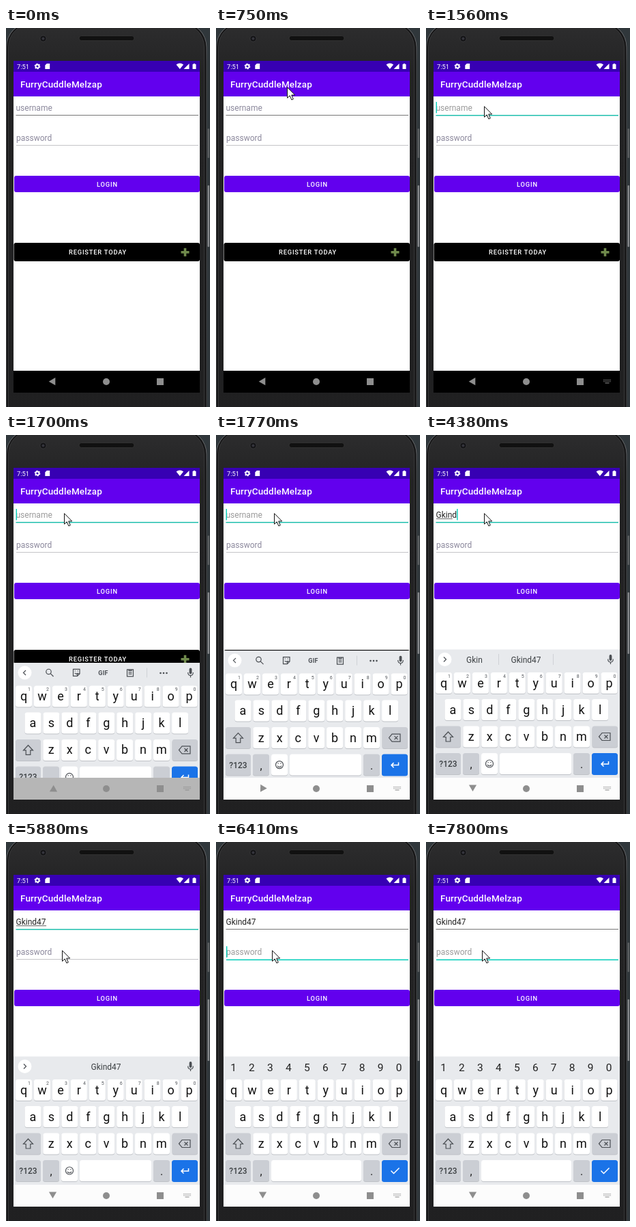
These frames come from a looping animation (299x554 px, 8 s). An HTML page:

```html
<!DOCTYPE html>
<html lang="en">
<head>
<meta charset="utf-8">
<title>Login screen</title>
<style>
html, body { margin: 0; width: 100%; height: 100%; overflow: hidden; background: #343a3d; }
svg { display: block; width: 299px; height: 554px; font-family: Roboto, "Noto Sans", sans-serif; }
.btn { font-size: 9.3px; font-weight: 500; letter-spacing: .83px; fill: #fff; }
.field { font-size: 12px; }
.key { font-size: 18px; text-anchor: middle; fill: #111; }
.digit { font-size: 15.5px; text-anchor: middle; fill: #222; }
.mark { font-size: 16px; text-anchor: middle; fill: #222; }
.tiny { font-size: 7px; text-anchor: middle; fill: #55595e; }
.sug { font-size: 12px; text-anchor: middle; fill: #3c4043; }
.line { fill: none; stroke: #4b4f54; stroke-width: 1.2; }
</style>
</head>
<body>
<svg viewBox="0 0 299 554">
  <defs>
    <linearGradient id="shell" x2="0" y2="1">
      <stop offset="0" stop-color="#2d2d2e"/><stop offset=".12" stop-color="#232324"/><stop offset="1" stop-color="#202021"/>
    </linearGradient>
    <linearGradient id="rim" x2="0" y2="1">
      <stop offset="0" stop-color="#77797c"/><stop offset=".1" stop-color="#4a4b4d"/><stop offset="1" stop-color="#3c3d3e"/>
    </linearGradient>
    <clipPath id="screen"><rect x="11" y="48" width="273" height="485"/></clipPath>
  </defs>

  <rect width="299" height="554" fill="#30373b"/>
  <rect x="295.5" y="147" width="2.5" height="43" rx="1" fill="#5c5f61"/>
  <rect x="295.5" y="230" width="2.5" height="90" rx="1" fill="#85878a"/>
  <rect x=".5" y="-8" width="293.500" height="610" rx="36" fill="#161617" stroke="url(#rim)"/>
  <rect x="3.5" y="-6" width="287" height="606" rx="34" fill="url(#shell)" stroke="#39393a"/>
  <rect x="107" y="11.5" width="81" height="7" rx="3.5" fill="#111" stroke="#363637" stroke-width=".8"/>
  <circle cx="54.5" cy="15.5" r="4.6" fill="#141416" stroke="#38383b"/>
  <circle cx="54.5" cy="15.5" r="2" fill="#34343c"/>

  <g clip-path="url(#screen)">
    <rect x="11" y="48" width="273" height="485" fill="#fff"/>
    <rect x="11" y="48" width="273" height="16" fill="#3700b3"/>
    <rect x="11" y="64" width="273" height="36" fill="#6200ee"/>
    <g fill="#fff">
      <text x="16" y="59.5" font-size="9.3">7:51</text>
      <circle cx="46" cy="56" r="2.5" fill="none" stroke="#fff" stroke-width="1.8"/>
      <circle cx="46" cy="56" r="3.7" fill="none" stroke="#fff" stroke-width="1.3" stroke-dasharray="1.9 1.97"/>
      <path d="M59.8 52h4.4v8h-6.9v-5.5z"/>
      <path d="M249.5 53.5q5.3-4 10.6 0l-5.3 6.5z"/>
      <path d="M268.5 52v8h-8z"/>
      <path d="M273.5 53h1.2v-1h2.6v1h1.2v7h-5z"/>
      <text x="21" y="87" font-size="13.5" font-weight="500" letter-spacing=".15">FurryCuddleMelzap</text>
    </g>

    <text id="userHint" class="field" x="14.5" y="121">username</text>
    <text id="user" class="field" x="14.5" y="121" fill="#222"></text>
    <rect id="compose" x="15" y="122.2" height=".8" fill="#444"/>
    <rect id="userLine" x="14.5" width="267.5"/>
    <text id="passHint" class="field" x="15" y="165.4">password</text>
    <rect id="passLine" x="15" width="267"/>
    <rect id="caret" width="1.4" height="16.5" fill="#03cdb9"/>

    <rect x="12" y="216" width="272" height="24" rx="3" fill="#6200ee"/>
    <text class="btn" x="133" y="231.7">LOGIN</text>
    <rect x="11.5" y="314" width="272.5" height="27" rx="3" fill="#000"/>
    <text class="btn" x="92" y="331">REGISTER TODAY</text>
    <path d="M262.5 321.7v12M256.5 327.7h12" stroke="#708a4c" stroke-width="3.6"/>

    <g id="board"></g>

    <rect id="nav" x="11" y="501" width="273" height="32"/>
    <g fill="#8e8e8e">
      <path id="back" d="M-4.8 0L4.8-5.6V5.6z"/>
      <circle cx="147" cy="517" r="5"/>
      <rect x="221" y="512" width="10" height="10"/>
      <g id="imeIcon" fill="none" stroke="#8e8e8e">
        <path d="M260 514.500h11M260 516.700h11" stroke-width="1.1" stroke-dasharray="1.2 .75"/>
        <path d="M262.500 519h6" stroke-width="1"/>
      </g>
    </g>
  </g>

  <path id="pointer" d="M.5.7V16.3L4.2 12.9 6.9 19 9.3 17.9 6.7 12H11.7z" fill="#fff" stroke="#111" stroke-linejoin="round"/>
</svg>

<script>
const LOOP = 8000, STEP = 70;
const $ = id => document.getElementById(id);
const set = (id, attrs) => { for (const k in attrs) $(id).setAttribute(k, attrs[k]); };
const show = (id, on) => set(id, { visibility: on ? "visible" : "hidden" });

// --- keyboard ---
const PITCH = 26.95;
const GREY = "#cbced4", BLUE = "#1a73e8";
const cap = (x, y, w, fill = "#fff", edge = "#bfc2c7") =>
  `<rect x="${x}" y="${y + 1}" width="${w}" height="31" rx="3.5" fill="${edge}"/>` +
  `<rect x="${x}" y="${y}" width="${w}" height="31" rx="3.5" fill="${fill}"/>`;
const label = (cls, x, y, s) => `<text class="${cls}" x="${x}" y="${y}">${s}</text>`;
const row = (letters, x0, y) => [...letters].map((c, i) => {
  const x = x0 + i * PITCH;
  return cap(x - 12, y, 24) + label("key", x, y + 21.5, c);
}).join("");
const digits = (cls, x0, y) => [..."1234567890"].map((d, i) => label(cls, x0 + i * PITCH, y, d)).join("");
const chevron = d => `<circle cx="27.5" cy="328" r="10" fill="#fff"/><path class="line" d="${d}"/>`;

$("board").innerHTML = `
  <rect x="11" y="313.5" width="273" height="190" fill="#e8eaed"/>
  ${row("qwertyuiop", 26, 347)}${row("asdfghjkl", 39.5, 386)}${row("zxcvbnm", 66.3, 425.5)}
  ${cap(14, 425.5, 37, GREY)}${cap(243.5, 425.5, 37.5, GREY)}
  ${cap(14, 465, 37, GREY)}${cap(54, 465, 24, GREY)}${cap(216, 465, 24, GREY)}${cap(243, 465, 38, BLUE, BLUE)}
  <path class="line" d="M32.5 434l7 7.5h-3.7v6.5h-6.6v-6.5h-3.7z"/>
  <path class="line" d="M253.5 441l4.5-5.5h12v11h-12zM261.5 438.5l5 5M266.5 438.5l-5 5"/>
  <text x="32.5" y="485" font-size="12" font-weight="500" text-anchor="middle" fill="#3c4043">?123</text>
  ${label("mark", 66, 487, ",")}${label("mark", 228, 487, ".")}
  <g id="textKeys">
    ${digits("tiny", 34, 355)}${cap(81, 465, 24)}${cap(108, 465, 105)}
    <circle class="line" cx="93" cy="480.5" r="5.5"/>
    <path class="line" d="M90 482q3 3.5 6 0M90.5 478.5h1.3M94.2 478.5h1.3"/>
    <path d="M267.5 477v4h-10.500m3.500-3.500l-3.500 3.500 3.500 3.500" fill="none" stroke="#fff" stroke-width="1.5"/>
    <path d="M270.5 323v5" stroke="#4b4f54" stroke-width="3.8" stroke-linecap="round"/>
    <path class="line" d="M266.7 327.500q0 4.500 3.800 4.500t3.800-4.500M270.5 332v3"/>
  </g>
  <g id="passKeys">
    ${digits("digit", 25.5, 334.5)}
    ${cap(81, 465, 132)}
    <path d="M256.5 480.5l4 4 8-8" fill="none" stroke="#fff" stroke-width="1.5"/>
  </g>
  <g id="tools">
    ${chevron("M29 324.5l-3.5 3.5 3.5 3.5")}
    <circle class="line" cx="62.5" cy="326.5" r="3.7"/><path class="line" d="M65.2 329.2l4.3 4.3"/>
    <path class="line" d="M98.500 323h9.500v6.500l-3.500 3.500h-6zM108 329.500h-3.500v3.500M100.800 328.500q2 2.500 4.500 0M100.800 325.500h1M104.500 325.500h1"/>
    <text x="142.5" y="331.5" font-size="9" font-weight="700" letter-spacing=".3" text-anchor="middle" fill="#4b4f54">GIF</text>
    <path class="line" d="M177.500 323.500h9v10h-9zM180 323.500h4v1.500h-4zM179.500 327.500h5M179.500 330h5"/>
    <path d="M206.5 321v14" stroke="#cfd2d6"/>
    <g fill="#4b4f54"><circle cx="226.5" cy="328.5" r="1.3"/><circle cx="231" cy="328.5" r="1.3"/><circle cx="235.5" cy="328.5" r="1.3"/></g>
  </g>
  <g id="words">
    ${chevron("M26 324.5l3.5 3.5-3.5 3.5")}
    <path id="bars" d="M106.5 320v16M186.5 320v16" stroke="#cfd2d6"/>
    ${[71, 146.5, 222].map((x, i) => `<text id="w${i}" class="sug" x="${x}" y="332.5"></text>`).join("")}
  </g>`;

// --- timeline ---
const NAME = "Gkind47";
const typed = [[2840, 1], [3370, 2], [3710, 3], [3980, 4], [4380, 5], [4710, 6], [5000, 7]];
const suggested = [
  [3040, 1, "G,Good,Get"], [3640, 2, "Gk,Good," + NAME], [3910, 3, `Gki,${NAME},`],
  [4180, 4, `Gkin,${NAME},`], [4580, 5, `Gkind,${NAME},`], [4930, 6, `Gkind4,${NAME},`],
  [5200, 7, `,${NAME},`]
];
const FOCUS = 1350, SLIDE = 1560, SWAP = 6210, PASSKEYS = 6340;
const caretOn = [[1350, 2510], [2840, 5600], [6210, 6810], [7340, 7800]];
const moves = [
  { at: 190, steps: 11, path: [[264, 464], [236, 372], [196, 268], [146, 158], [104, 86], [85, 114]] },
  { at: 5600, steps: 5, path: [[85, 114], [84, 136], [82, 158]] }
];

const latest = (table, t) => table.filter(r => r[0] <= t).pop();
const clamp = x => Math.max(0, Math.min(1, x));

function along(path, p) {
  const s = p * (path.length - 1), i = Math.min(Math.floor(s), path.length - 2), f = s - i;
  return path[i].map((v, k) => v + (path[i + 1][k] - v) * f);
}

function drawPointer(t) {
  const m = moves.filter(m => m.at <= t).pop();
  show("pointer", m);
  if (!m) return;
  const n = Math.min(m.steps - 1, Math.floor((t - m.at) / STEP));
  const [x, y] = along(m.path, n / (m.steps - 1));
  set("pointer", { transform: `translate(${x} ${y})` });
}

function drawFields(t) {
  const onUser = t >= FOCUS && t < SWAP, onPass = t >= SWAP;
  const text = NAME.slice(0, (latest(typed, t) || [0, 0])[1]);
  const lined = onUser ? (latest(suggested, t) || [0, 0])[1] : 0;
  $("user").textContent = text;
  const width = n => n ? $("user").getSubStringLength(0, n) : 0;
  show("userHint", !text);
  set("userHint", { fill: onUser ? "#9a9a9a" : "#8b889c" });
  set("passHint", { fill: onPass ? "#9a9a9a" : "#8b889c" });
  set("userLine", onUser ? { y: 127, height: 1.5, fill: "#1fbfae" } : { y: 127, height: 1, fill: "#777" });
  set("passLine", onPass ? { y: 171.5, height: 1.5, fill: "#03cdb9" } : { y: 171, height: 1, fill: "#c4c4c8" });
  set("compose", { width: width(lined) });
  show("caret", caretOn.some(([a, b]) => t >= a && t < b));
  set("caret", onPass ? { x: 15, y: 152.3 } : { x: 14.6 + width(text.length), y: 108 });
}

function drawBoard(t) {
  const p = clamp((t - SLIDE) / 265), pass = t >= PASSKEYS;
  show("board", p > 0);
  set("board", { transform: `translate(0 ${190 * (1 - p) ** 3})` });
  const words = latest(suggested, t);
  const put = (id, on) => set(id, { display: on ? "inline" : "none" });
  put("textKeys", !pass);
  put("passKeys", pass);
  put("tools", !words);
  put("words", words && !pass);
  put("bars", t < 5200);
  if (words) words[2].split(",").forEach((w, i) => { $("w" + i).textContent = w; });

  const v = Math.round(252 * clamp((t - 1600) / 140));
  set("nav", { fill: `rgb(${v},${v},${v})` });
  show("imeIcon", t >= 1490);
  // the back arrow swings round while drifting right
  const turn = clamp((t - 1630) / 210);
  const x = 67.5 + turn + 2 * Math.sin(turn * Math.PI);
  set("back", { transform: `translate(${x} ${516.7 - .5 * turn}) rotate(${270 * turn})` });
}

function render(t) {
  drawPointer(t);
  drawFields(t);
  drawBoard(t);
}

const start = performance.now();
function tick() {
  render((performance.now() - start) % LOOP);
  requestAnimationFrame(tick);
}
tick();
</script>
</body>
</html>
```
